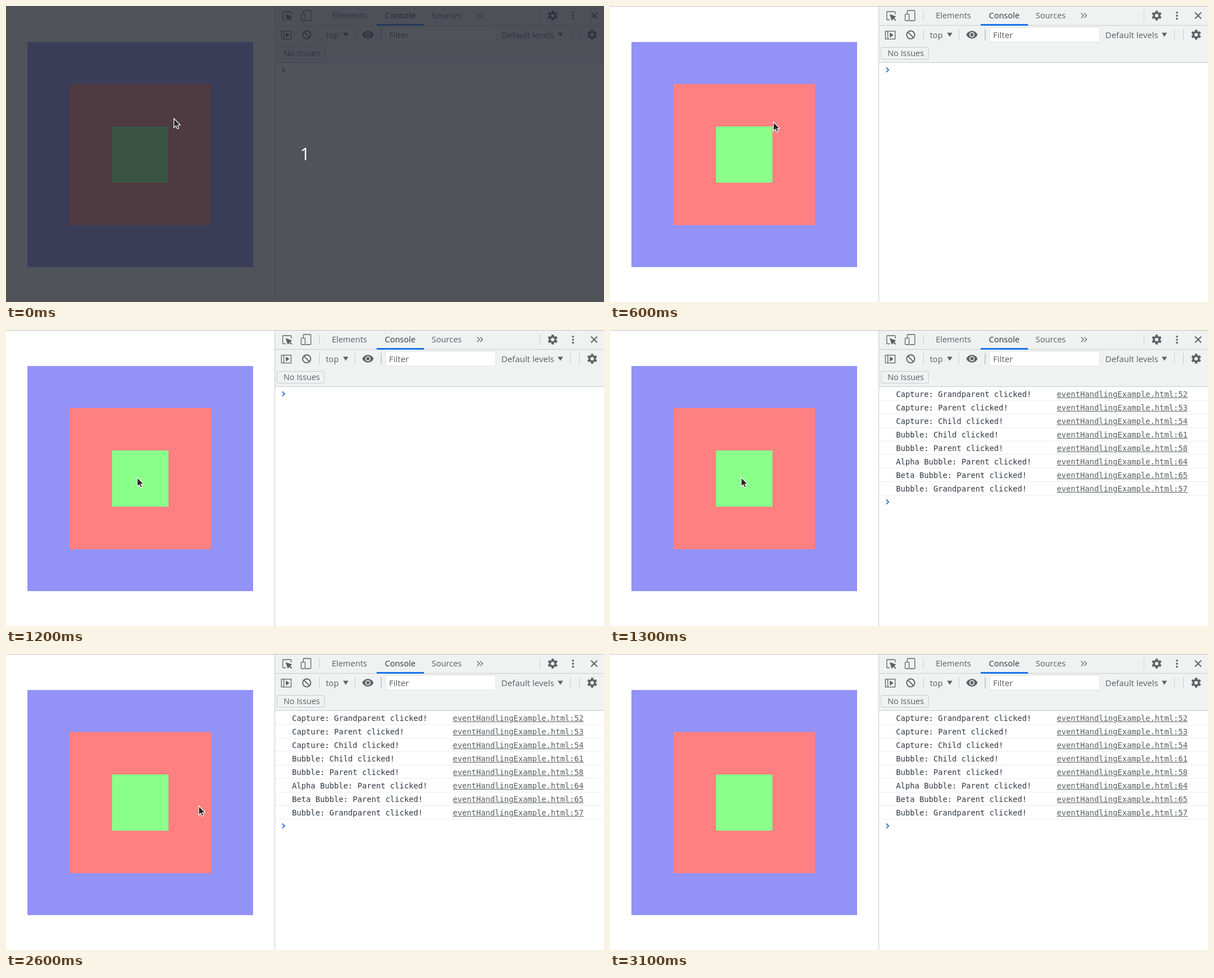
Recreate the animation shown at these times as an HTML page with a canvas. Size 1060 by 526 pixels, loop 6100 ms.

```html
<!DOCTYPE html>
<html lang="en">
<head>
<meta charset="utf-8">
<title>Event capture and bubbling</title>
<style>
html, body { margin: 0; width: 100%; height: 100%; overflow: hidden; background: #fff; }
canvas { display: block; }
</style>
</head>
<body>
<canvas id="stage" width="1060" height="526"></canvas>
<script>
const stage = document.getElementById('stage');
const ctx = stage.getContext('2d');
const { width: W, height: H } = stage;

const LOOP = 6100;
const TICK = 100;
const INTRO_END = 400;
const LOG_TIME = 1300;
const POINTER_END = 3100;

const PANEL = 477;
const ROW = 24;
const UI = '"Open Sans", "Noto Sans", sans-serif';
const MONO = '13.75px "DejaVu Sans Mono", monospace';
const INK = '#5a5d62';
const ICON = '#5f6164';
const BAR = '#f0f2f2';
const RULE = '#c8cacd';

// bend > 1 makes the vertical part of a move start late
const moves = [
  { start: 500, span: 100, dx: -8, dy: 6 },
  { start: 700, span: 200, dx: -56, dy: 56 },
  { start: 1100, span: 100, dx: -1, dy: 0 },
  { start: 2200, span: 200, dx: 5, dy: 0 },
  { start: 2500, span: 100, dx: 104, dy: 8 },
  { start: 2600, span: 300, dx: 431, dy: -185, bend: 3 }
];

const logs = [
  ['Capture: Grandparent', 52],
  ['Capture: Parent', 53],
  ['Capture: Child', 54],
  ['Bubble: Child', 61],
  ['Bubble: Parent', 58],
  ['Alpha Bubble: Parent', 64],
  ['Beta Bubble: Parent', 65],
  ['Bubble: Grandparent', 57]
];

function rect(x, y, w, h, color) {
  ctx.fillStyle = color;
  ctx.fillRect(x, y, w, h);
}

function frameRect(x, y, w, h, radius = 0, color = ICON, width = 1.3) {
  ctx.beginPath();
  ctx.roundRect(x, y, w, h, radius);
  stroke(color, width);
}

function stroke(color, width) {
  ctx.strokeStyle = color;
  ctx.lineWidth = width;
  ctx.stroke();
}

function text(str, x, y, font, color) {
  ctx.font = font;
  ctx.fillStyle = color;
  ctx.fillText(str, x, y);
}

function label(str, x, y, size = 14.5, color = INK) {
  text(str, x, y, size + 'px ' + UI, color);
}

function trace(points, close) {
  ctx.beginPath();
  points.forEach(([x, y]) => ctx.lineTo(x, y));
  if (close) ctx.closePath();
}

function line(points, color = ICON, width = 1.3) {
  trace(points);
  stroke(color, width);
}

function shape(points, color = ICON) {
  trace(points, true);
  ctx.fillStyle = color;
  ctx.fill();
}

function disc(x, y, r, color = ICON) {
  ctx.beginPath();
  ctx.arc(x, y, r, 0, Math.PI * 2);
  ctx.fillStyle = color;
  ctx.fill();
}

function chevron(x, y, r, color, width) {
  line([[x, y - r], [x + r, y], [x, y + r]], color, width);
}

function slash(x, y, r, dir = 1) {
  line([[x - r, y - r * dir], [x + r, y + r * dir]], ICON, 1.9);
}

function separator(x, y, h) {
  rect(x, y, 1, h, RULE);
}

function dropArrow(x) {
  shape([[x, 47.5], [x + 9.4, 47.5], [x + 4.7, 54.7]]);
}

function gear(cx, cy) {
  const points = [];
  for (let corner = 0; corner < 24; corner++) {
    const side = corner % 4;
    const outer = side === 1 || side === 2;
    const offset = (side < 2 ? -1 : 1) * (outer ? 0.24 : 0.32);
    const angle = Math.PI / 2 + Math.floor(corner / 4) * Math.PI / 3 + offset;
    const r = outer ? 9 : 6.6;
    points.push([cx + r * Math.cos(angle), cy + r * Math.sin(angle)]);
  }
  shape(points);
  disc(cx, cy, 3.1, BAR);
}

function inspectIcon() {
  frameRect(490.6, 10, 15, 14.5, 1);
  rect(496, 15, 12, 12, BAR);
  shape([[495.5, 14.5], [507, 18.6], [499.4, 26]]);
  slash(503.5, 22.5, 3);
}

function deviceIcon() {
  frameRect(527, 8, 13.4, 18, 1);
  rect(522, 14, 9, 13, BAR);
  frameRect(523.2, 14.4, 7, 11.6, 1);
}

function eyeIcon() {
  ctx.beginPath();
  ctx.moveTo(631.5, 51);
  ctx.bezierCurveTo(635, 42, 648, 42, 651.5, 51);
  ctx.bezierCurveTo(648, 60, 635, 60, 631.5, 51);
  ctx.fillStyle = ICON;
  ctx.fill();
  disc(641.5, 51, 4.6, BAR);
  disc(641.5, 51, 2.9);
}

function drawTabs() {
  inspectIcon();
  deviceIcon();
  separator(555, 8, 18);
  label('Elements', 577.5, 22);
  label('Console', 671.5, 22, 14.5, '#303236');
  label('Sources', 754.5, 22);
  rect(657, 32, 84, 3, '#1a73e8');
  chevron(835, 17, 4.4);
  chevron(840.5, 17, 4.4);
  separator(946, 8, 18);
  gear(969, 17);
  for (let i = -1; i <= 1; i++) disc(1005, 17.2 + i * 5.4, 1.8);
  slash(1042.5, 17, 5.5);
  slash(1042.5, 17, 5.5, -1);
}

function drawFilters() {
  frameRect(488.2, 44.6, 17.2, 14);
  line([[492.5, 44.6], [492.5, 58.6]]);
  shape([[496, 47.3], [502.5, 51.6], [496, 55.9]]);
  frameRect(525.9, 44.2, 14.2, 14.2, 7.1, ICON, 1.9);
  slash(533, 51.3, 5);
  for (const x of [555, 618, 664, 665, 1000, 1016]) separator(x, 41, 20);
  label('top', 567, 57);
  dropArrow(597.5);
  eyeIcon();
  rect(673, 38, 195, 26, '#fff');
  frameRect(673, 38, 195, 26, 0, '#e0e2e4', 1);
  label('Filter', 679, 57, 15);
  label('Default levels', 878, 57, 15);
  dropArrow(978);
  gear(1039, 51);
  frameRect(480.5, 73.5, 84, 21, 2, RULE, 1);
  label('No Issues', 492, 89, 14.3);
}

function drawLink(str, x, y) {
  ctx.font = MONO;
  rect(x, y + 1, ctx.measureText(str).width, 1, INK);
  // a white halo breaks the underline around descenders
  ctx.strokeStyle = '#fff';
  ctx.lineWidth = 2;
  ctx.strokeText(str, x, y);
  text(str, x, y, MONO, INK);
}

function drawConsole(rows) {
  rows.forEach(([message, source], i) => {
    const y = 119 + i * ROW;
    text(message + ' clicked!', 507, y, MONO, '#303942');
    drawLink('eventHandlingExample.html:' + source, 792, y);
    rect(PANEL, y + 6, W - PANEL, 1, '#ededee');
  });
  chevron(489.7, 113.5 + rows.length * ROW, 4.2, '#2d73df', 1.9);
}

function drawSquares() {
  const squares = [[400, '#9292f7'], [251, '#ff8080'], [100, '#8aff8a']];
  for (const [size, color] of squares) {
    rect(238 - size / 2, 264 - size / 2, size, size, color);
  }
}

function drawPage(rows) {
  rect(0, 0, W, H, '#fff');
  drawSquares();
  rect(PANEL, 1, W - PANEL, 99, BAR);
  rect(0, 0, W, 1, '#c1c1c1');
  rect(PANEL - 1, 0, 1, H, RULE);
  for (const y of [34, 100]) rect(PANEL, y, W - PANEL, 1, RULE);
  drawTabs();
  drawFilters();
  drawConsole(rows);
}

function pointerAt(t) {
  let x = 297, y = 199;
  for (const { start, span, dx, dy, bend = 1 } of moves) {
    const p = Math.min(1, Math.max(0, (t - start) / span));
    x += dx * p;
    y += dy * p ** bend;
  }
  return [Math.round(x), Math.round(y)];
}

function drawPointer(t) {
  if (t >= POINTER_END) return;
  ctx.save();
  ctx.translate(...pointerAt(Math.floor(t / TICK) * TICK));
  shape([[0.6, 1], [0.6, 17.2], [4.3, 14], [6.7, 19.3], [9.4, 18.1], [7.2, 13], [12, 12.5]], '#262626');
  stroke('#fff', 1.2);
  ctx.restore();
}

function drawCountdown() {
  rect(0, 0, W, H, 'rgba(37, 41, 49, 0.8)');
  ctx.textAlign = 'center';
  label('1', W / 2, 274, 31, '#fff');
  ctx.textAlign = 'left';
}

function frame(now) {
  const t = now % LOOP;
  drawPage(t >= LOG_TIME ? logs : []);
  if (t < INTRO_END) drawCountdown();
  drawPointer(t);
  requestAnimationFrame(frame);
}

requestAnimationFrame(frame);
</script>
</body>
</html>
```
